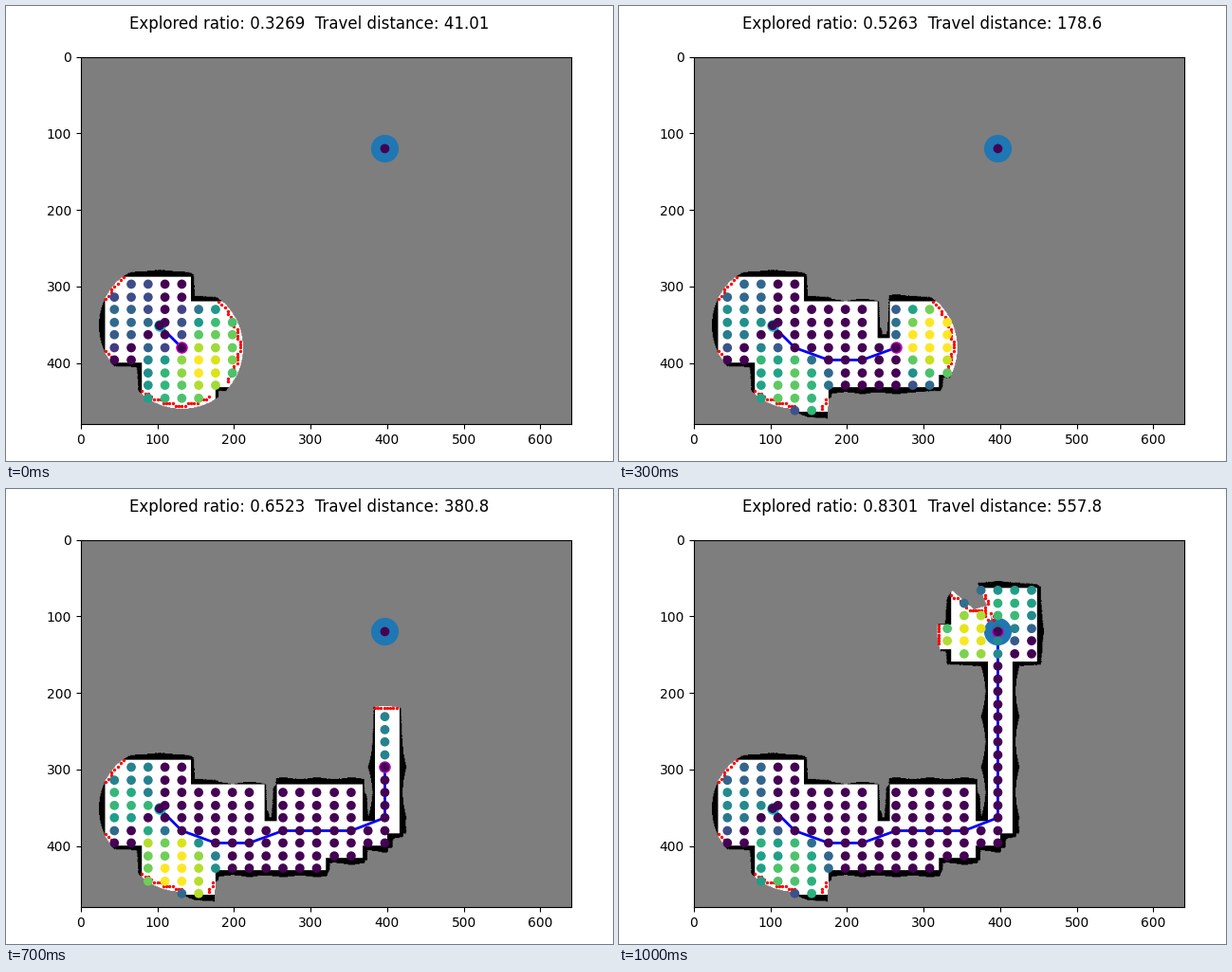
These frames come from a looping animation (640x480 px, 1100 ms). A matplotlib script:

```python
import numpy as np
import matplotlib.pyplot as plt
from matplotlib.animation import FuncAnimation

W, H, TILE, CELL = 640, 480, 16, 4
WALL, UNKNOWN, FREE = 1, 127, 255
SENSOR_RANGE, VIEW_RANGE, MIN_VIEW = 80, 70, 5
START, TARGET = (103, 351), (397, 120)
PILLAR = np.s_[110:113, 389:393]
RATIOS = [.3269, .3933, .4553, .5263, .5763, .5883,
          .6206, .6523, .684, .7771, .8301]

# Free space in tiles: left, top, right, bottom
ROOMS = [(2, 18, 9, 25), (5, 20, 11, 29), (9, 20, 15, 27),
         (11, 23, 20, 27), (16, 20, 23, 26), (20, 23, 25, 25),
         (24, 10, 26, 24), (21, 4, 28, 10), (17, 7, 21, 9)]

GRID_X, GRID_Y = (np.linspace(0, n - 1, 30).round().astype(int)
                  for n in (W, H))


def build_world():
    world = np.full((H, W), WALL)
    for x0, y0, x1, y1 in ROOMS:
        world[y0 * TILE:y1 * TILE, x0 * TILE:x1 * TILE] = FREE
    world[PILLAR] = WALL
    return world


def plan_route():
    """Two grid columns a step through the rooms, then four rows up."""
    cols = np.arange(6, 19, 2)
    rows = np.interp(cols, [6, 8, 10, 12, 16, 18], [23, 24, 24, 23, 23, 22])
    steps = [(c, int(r)) for c, r in zip(cols, rows)]
    steps += [(18, r) for r in range(18, 9, -4)]
    return [(int(GRID_X[c]), int(GRID_Y[r])) for c, r in steps] + [TARGET]


def cast_ray(x, y, x1, y1, world, belief):
    """Walk the grid along a ray, entering walls a few cells deep."""
    dx, dy = abs(x1 - x), abs(y1 - y)
    sx, sy = (1 if x1 > x else -1), (1 if y1 > y else -1)
    error, hits = dx - dy, 0
    while 0 <= x < W and 0 <= y < H:
        k = world[y][x]
        if k == WALL:
            hits += 1
            if hits >= 10:
                break
        elif hits:
            break
        if x == x1 and y == y1:
            break
        belief[y, x] = k
        if error > 0:
            x += sx
            error -= 2 * dy
        else:
            y += sy
            error += 2 * dx


def scan(pos, world, belief):
    x, y = pos
    for a in np.radians(np.arange(0, 360, .5)):
        x1 = int(round(x + SENSOR_RANGE * np.cos(a)))
        y1 = int(round(y + SENSOR_RANGE * np.sin(a)))
        cast_ray(x, y, x1, y1, world, belief)


def find_frontiers(belief):
    """Free coarse cells that touch unknown ones."""
    coarse = belief.reshape(H // CELL, CELL, W // CELL, CELL).min(axis=(1, 3))
    rows, cols = coarse.shape
    pad = np.pad((coarse == UNKNOWN).astype(int), 1)
    near = sum(pad[i:i + rows, j:j + cols]
               for i in range(3) for j in range(3) if (i, j) != (1, 1))
    ys, xs = np.nonzero((coarse == FREE) & (near > 1) & (near < 8))
    return np.column_stack([xs, ys]) * CELL


def utility(node, frontiers, belief):
    """Number of frontier points in clear view of a node."""
    d = frontiers - node
    d = d[np.hypot(d[:, 0], d[:, 1]) < VIEW_RANGE]
    t = np.linspace(0, 1, 90)[:, None]
    xs = np.rint(node[0] + t * d[:, 0]).astype(int)
    ys = np.rint(node[1] + t * d[:, 1]).astype(int)
    count = (belief[ys, xs] == FREE).all(axis=0).sum()
    return count if count >= MIN_VIEW else 0


def explore():
    world = build_world().tolist()
    belief = np.full((H, W), UNKNOWN)
    grid = np.array([(x, y) for x in GRID_X for y in GRID_Y])
    scan(START, world, belief)
    route, states = [START], []
    for pos, ratio in zip(plan_route(), RATIOS):
        scan(pos, world, belief)
        route.append(pos)
        path = np.array(route)
        dist = np.hypot(*np.diff(path, axis=0).T).sum()
        frontiers = find_frontiers(belief)
        known = grid[belief[grid[:, 1], grid[:, 0]] == FREE]
        nodes = np.vstack([known, START, TARGET])
        visited = {*route, TARGET}
        values = np.array([0 if tuple(n) in visited
                           else utility(n, frontiers, belief)
                           for n in nodes.tolist()])
        text = f"Explored ratio: {ratio:.4g}  Travel distance: {dist:.4g}"
        states.append((belief.copy(), path, frontiers, nodes, values, text))
    return states


states = explore()

fig, ax = plt.subplots(figsize=(6.4, 4.8), dpi=100)
image = ax.imshow(states[0][0], cmap="gray", vmin=WALL, vmax=FREE)
ax.axis((0, W, H, 0))

ax.plot(*TARGET, "o", color="C0", markersize=20, zorder=1.5)
line, = ax.plot([], [], "b", linewidth=2)
robot, = ax.plot([], [], "mo", markersize=8)
ax.plot(*START, "co", markersize=8)
edge_dots = ax.scatter([], [], c="r", s=2, zorder=3)
node_dots = ax.scatter([0], [0], c=[0], cmap="viridis", zorder=5)
title = fig.suptitle("")


def update(i):
    belief, path, frontiers, nodes, values, text = states[i]
    image.set_data(belief)
    line.set_data(path[:, 0], path[:, 1])
    robot.set_data(path[-1:, 0], path[-1:, 1])
    edge_dots.set_offsets(frontiers)
    node_dots.set_offsets(nodes)
    node_dots.set_array(values)
    node_dots.set_clim(0, values.max())
    title.set_text(text)
    return image, line, robot, edge_dots, node_dots, title


update(0)
fig.tight_layout()
anim = FuncAnimation(fig, update, frames=len(states), interval=100,
                     repeat=True, repeat_delay=0)
plt.show()
```
